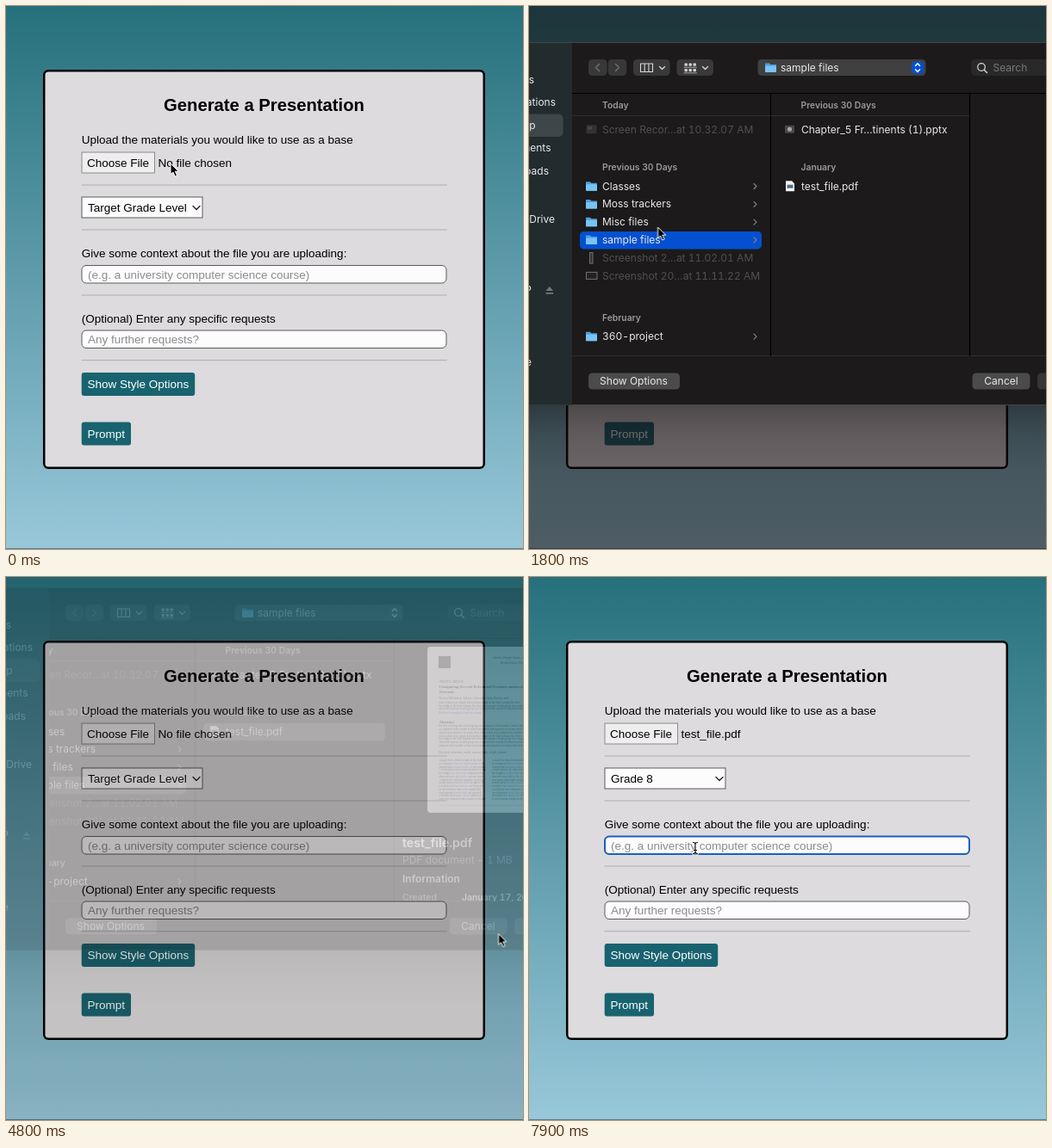
An HTML page that plays this animation: 600 by 631 pixels, repeating every 8000 ms.

```html
<!DOCTYPE html>
<html lang="en">
<head>
<meta charset="utf-8">
<title>Generate a Presentation</title>
<style>
html, body { margin: 0; width: 100%; height: 100%; overflow: hidden; background: #26707c; }
svg { display: block; width: 100vw; height: 100vh; }
text { font: 13.5px "Liberation Sans", Arial, sans-serif; white-space: pre; }
.title { font-size: 20.25px; font-weight: bold; }
.hint { fill: #8b8b8d; }
.white { fill: #fff; }
.mac text { font: 12px Inter, sans-serif; font-variant-numeric: tabular-nums; fill: #e9e9e9; }
.mac .head { font-size: 10.3px; font-weight: 600; fill: #9b9b9b; }
.mac .dim { fill: #515151; }
.mac .grey { fill: #929292; }
.mac .bold { font-weight: 600; }
.mac .small { font-size: 10.4px; }
.mac .name { font-size: 14.2px; }
.mac .option { font-size: 12.6px; fill: #f0f0f0; }
.mac .paper { font: 3.1px "Liberation Serif", serif; fill: #1c1c1c; }
.mac .paper.lead { font-size: 4.7px; font-weight: bold; fill: #111; }
.mac .paper.by { font-size: 3.8px; }
.mac .link { fill: #2a56c8; }
.line { fill: none; stroke-linecap: round; stroke-linejoin: round; }

/* One 8 s clock for everything; 1.25% is 100 ms. */
[class*="at-"] { animation: 8s step-end infinite; }
.was { --a: 1; --b: 0; }
.now { --a: 0; --b: 1; }
.at-list { animation-name: list; }
.at-pick { animation-name: pick; }
.at-named { animation-name: named; }
.at-graded { animation-name: graded; }
.at-beam { animation-name: beam; }
.at-focus { animation-name: focus; }
.at-caret { animation-name: caret; }
.at-menu { animation-name: menu; }
.at-blur { animation-name: blur; }
.at-open { animation-name: open; }
@keyframes list { 0% { opacity: var(--a) } 16.9%, 100% { opacity: var(--b) } }
@keyframes pick { 0% { opacity: var(--a) } 32.5%, 100% { opacity: var(--b) } }
@keyframes named { 0% { opacity: var(--a) } 62.5%, 100% { opacity: var(--b) } }
@keyframes graded { 0% { opacity: var(--a) } 88.1%, 100% { opacity: var(--b) } }
@keyframes beam { 0% { opacity: var(--a) } 91.3%, 100% { opacity: var(--b) } }
@keyframes focus { 0% { opacity: 0 } 93.1%, 100% { opacity: 1 } }
@keyframes caret { 0% { opacity: 0 } 93.1% { opacity: 1 } 97.5%, 100% { opacity: 0 } }
@keyframes menu { 0% { opacity: 0 } 72.5% { opacity: 1 } 88.1%, 100% { opacity: 0 } }
@keyframes blur { 0% { fill: #0450d0 } 53.1%, 100% { fill: #474747 } }
@keyframes open { 0% { fill: #363636 } 32.5% { fill: #0a5be0 } 53.1%, 100% { fill: #4b4b4b } }

#shade { animation: shade 8s linear infinite; }
#sheet { animation: sheet 8s linear infinite; }
#columns { animation: scroll 8s ease-in-out infinite; }
#hover { animation: hover 8s step-end infinite; }
#pointer { animation: pointer 8s ease-in-out infinite; }
@keyframes shade {
  0%, 10.6% { opacity: 0 } 11.25% { opacity: .14 } 12.5% { opacity: .36 } 15%, 55% { opacity: .56 }
  57.5% { opacity: .36 } 61.25%, 100% { opacity: 0 }
}
@keyframes sheet {
  0%, 10.6% { opacity: 0; transform: translateY(-42px) }
  11.25% { opacity: .56; transform: translateY(-26px) }
  12.5% { opacity: .86; transform: translateY(-10px) }
  15%, 55% { opacity: 1; transform: none }
  57.5% { opacity: .69; transform: translateY(-11.3px) }
  60% { opacity: .2; transform: translateY(-30px) }
  61.25%, 100% { opacity: 0; transform: translateY(-42px) }
}
@keyframes scroll { 0%, 32.5% { transform: none } 35%, 100% { transform: translateX(-61px) } }
@keyframes hover {
  0% { transform: none }
  75.25% { transform: none; animation-timing-function: steps(7) }
  85%, 100% { transform: translateY(151.76px) }
}
@keyframes pointer {
  0% { transform: translate(191px, 183px) }
  7.5%, 16.25% { transform: translate(143.5px, 172px) }
  22.5% { transform: translate(149.5px, 257px); animation-timing-function: ease-in }
  27.5% { transform: translate(250px, 238px); animation-timing-function: ease-out }
  31.9%, 34.4% { transform: translate(330px, 211px) }
  41.25% { transform: translate(596px, 434px) }
  50% { transform: translate(597px, 433px) }
  57.5% { transform: translate(597.5px, 432px) }
  63.75%, 65% { transform: translate(520px, 380px) }
  71.25% { transform: translate(205px, 234px) }
  75% { transform: translate(198.5px, 241px) }
  76.25% { transform: translate(198.5px, 241px); animation-timing-function: linear }
  85.6%, 88.1% { transform: translate(194px, 387px) }
  92.5%, 100% { transform: translate(193px, 315px) }
}
</style>
</head>
<body>
<svg id="stage" viewBox="0 0 600 631" preserveAspectRatio="none"></svg>
<script>
const text = (x, y, s, cls = "", more = "") => `<text x="${x}" y="${y}" class="${cls}" ${more}>${s}</text>`;
const box = (x, y, w, h, fill, r = 0, more = "") =>
  `<rect x="${x}" y="${y}" width="${w}" height="${h}" rx="${r}" fill="${fill}" ${more}/>`;
const line = (d, stroke, width = 1, cls = "") =>
  `<path class="line ${cls}" d="${d}" stroke="${stroke}" stroke-width="${width}"/>`;
const group = (cls, ...parts) => `<g class="${cls}">${parts.join("")}</g>`;
const each = (list, fn) => list.map(fn).join("");
const range = n => [...Array(n).keys()];

// Web form
const field = (y, hint) =>
  box(88, y, 423, 20.5, "#fdfcfd", 5, 'stroke="#5a5a5c"') + text(95, y + 15, hint, "hint");
const button = (y, w, label) => box(87.7, y, w, 27, "#18636f", 3) + text(94.5, y + 18, label, "white");

const form = [
  box(0, 0, 600, 631, "url(#sky)"),
  box(0, 630, 600, 1, "#5d7f8b"),
  box(44.2, 75.2, 510.6, 461.6, "#dddbdd", 5, 'stroke="#000" stroke-width="2.5"'),
  text(299.5, 122, "Generate a Presentation", "title", 'text-anchor="middle"'),
  text(87.7, 160.3, "Upload the materials you would like to use as a base"),
  box(88, 170, 84.5, 24, "#efeeef", 0, 'stroke="#8a8a8c"'),
  text(94, 186.8, "Choose File"),
  text(176.5, 186.8, "No file chosen", "at-named was"),
  text(176.5, 186.8, "test_file.pdf", "at-named now"),
  each([208, 260, 336, 411.7], y => line(`M88 ${y}H511.5`, "#a9aeb6")),
  box(88, 222, 140, 24, "#fdfcfd", 0, 'stroke="#5a5a5c"'),
  text(95, 238.7, "Target Grade Level", "at-graded was"),
  text(95, 238.7, "Grade 8", "at-graded now"),
  line("M217 232.5l4 4 4-4", "#222", 1.3),
  text(87.7, 291.7, "Give some context about the file you are uploading:"),
  field(301.5, "(e.g. a university computer science course)"),
  box(88, 301.5, 423, 20.5, "none", 5, 'stroke="#1b5fc2" stroke-width="2" class="at-focus"'),
  line("M95 305V318.5", "#000", 1, "at-caret"),
  text(87.7, 368, "(Optional) Enter any specific requests"),
  field(377, "Any further requests?"),
  button(426, 131.5, "Show Style Options"),
  button(483.5, 57.3, "Prompt")
].join("");

// File chooser
const folder = (x, y) =>
  `<path d="M${x} ${y - 5}h5l1.5 1.5h6.5v9h-13z" fill="#4a9fdc"/>` + box(x, y - 2, 13, 7.5, "#79c3f3", 1);
const icons = {
  folder,
  recording: (x, y) => box(x + .5, y - 5, 12, 10, "#333", 1) + box(x + 2, y - 3, 5, 3, "#484848"),
  tall: (x, y) => box(x + 4.5, y - 6, 3.5, 12.5, "#333", 0, 'stroke="#737373"'),
  wide: (x, y) => box(x + .5, y - 4, 12.5, 8, "#222", 0, 'stroke="#737373"'),
  tile: (x, y) => box(x, y - 6.5, 13, 13, "#6a6a6a", 2),
  slides: (x, y) => box(x, y - 4.5, 11, 9, "#4b4747", 1) + box(x + 3, y - 2.5, 5, 5, "#aaa6a3", 2),
  pdf: (x, y) => `<path d="M${x + 1} ${y - 6}h7l3 3v9h-10z" fill="#f5f5f5"/>` + box(x + 2.5, y - 1.5, 7, 4, "#4c6d8c")
};
const row = (x, y, icon, name, cls = "") => icons[icon](x, y - .3) + text(x + 19, y + 4, name, cls) +
  (icon === "folder" ? line(`M${x + 195} ${y - 3}l3 3-3 3`, "#858585", 1.2) : "");
const head = (x, y, s) => text(x, y + 3.7, s, "head");
const selected = (x, y) => box(x, y - 10, 211, 20.5, "#0450d0", 4.5, 'class="at-blur"');

// The top heading of a column sits a little higher than the ones below it.
const recent = (headY, y) => head(85, headY, "Previous 30 Days") + selected(59, y + 62.4) +
  each(["Classes", "Moss trackers", "Misc files", "sample files"], (s, i) => row(66, y + i * 20.8, "folder", s)) +
  row(66, y + 83.4, "tall", "Screenshot 2…at 11.02.01 AM", "dim") +
  row(66, y + 104.2, "wide", "Screenshot 20…at 11.11.22 AM", "dim") +
  head(85, y + 152.3, "February") + row(66, y + 174.6, "folder", "360-project");

const filler = "the observed response of each group was compared with a model of shared movement and repeated over many short trials so that every sample had a similar weight in the final estimate ";
const words = (i, n) => (filler + filler).substr(i * 37 % filler.length, n);
const print = (x, y, s, cls = "") => text(x, y, s, "paper " + cls);
const body = (x, i) => print(x, 244 + i * 3.75, i % 3
  ? `${words(i, 12)}<tspan class="link">${words(i + 4, 17)}</tspan>${words(i + 2, 12)}` : words(i + x, 41));

const page = box(489, 111, 140, 193, "#fcfcfc", 4) + box(502, 122, 14, 14, "#4a4a4a") +
  print(565, 125, "Journal of Sample Studies, 12") + print(574, 131, "Research article 2024") +
  print(502.5, 152.5, "ORIGINAL ARTICLE") +
  print(502.5, 158.5, "Comparing Several Rehearsed Gestures across a", "lead") + print(502.5, 164.7, "Network", "lead") +
  print(502.5, 171.5, "Torvin Mellick ●, Sabrine Ostvald, Junia Parlow and", "by") +
  each(range(3), i => print(502.5, 177 + i * 3.6, words(i + 3, 78))) +
  print(502.5, 189, "Received in spring; accepted in autumn", "link") +
  print(502.5, 199.5, "Abstract", "lead") +
  each(range(7), i => print(502.5, 203.8 + i * 3.9, words(i, 80))) +
  print(502.5, 234.5, "Keywords: movement, model, response, trials, weight, estimate") +
  each(range(13), i => body(502.5, i) + body(564, i)) + line("M502 295.5H600", "#aaa", .5);

const preview = `<g transform="translate(61 0)">` + page +
  text(460, 344, "test_file.pdf", "name bold") + text(460, 362.5, "PDF document - 1 MB", "grey") +
  text(460, 385, "Information", "bold") + text(460, 406, "Created", "small grey bold") +
  text(529, 406, "January 17, 2024", "small bold") + "</g>";

const columns = `<g clip-path="url(#browser)"><g id="columns">` +
  line("M40 127.5H511", "#303030") +
  group("at-list was", recent(115, 143.3), head(85, 361.5, "January"),
    row(66, 383.5, "tile", "Polo On Our Rooftops", "dim")) +
  group("at-list now", head(85, 115, "Today"),
    row(66, 143.5, "recording", "Screen Recor…at 10.32.07 AM", "dim"), recent(187.5, 209.5)) +
  head(315.5, 115, "Previous 30 Days") + row(297, 143.5, "slides", "Chapter_5 Fr…tinents (1).pptx") +
  head(315.5, 187.5, "January") +
  group("at-pick now", selected(290, 209.7)) + row(297, 209.5, "pdf", "test_file.pdf") +
  group("at-pick now", preview) +
  line("M280.5 101V407M511.5 101V407", "#000", 1.2) + "</g></g>";

const places = [["Recents", 6, 86], ["Applications", 31, 112], ["Desktop", 7.5, 138.5], ["Documents", 25.5, 165],
  ["Downloads", 23, 191.5], ["Drive", 30, 248], ["P", 3, 330], ["Home", 3, 413.5]];
const sidebar = box(-5, 43, 55, 420.5, "#222c2e") + box(-10, 125.5, 49.5, 26.5, "#3d4648", 5) +
  each(places, ([s, x, y]) => text(x, y + 4, s, "", 'text-anchor="end"')) +
  `<path d="M19.5 331l4.3-5 4.3 5zM19.5 333h8.6v1.8h-8.6z" fill="#727979"/>`;

const down = x => line(`M${x} 70.5l3 3 3-3`, "#d0d0d0", 1.4);
const toolbar = box(69, 62, 21.5, 19, "#383838", 4.5) + box(91.8, 62, 21.5, 19, "#383838", 4.5) +
  line("M81.5 67.5l-4 4 4 4M100.5 67.5l4 4-4 4", "#707070", 1.4) +
  box(121, 62, 42.5, 19, "#393939", 4.5) + box(171.5, 62, 42.5, 19, "#393939", 4.5) +
  line("M129.5 67h14v9.5h-14zM134.2 67v9.5M138.9 67v9.5", "#d8d8d8", 1.1) + down(151.5) + down(201.5) +
  each(range(6), i => box(180.5 + i % 3 * 5, 66.5 + (i / 3 | 0) * 6.5, 3.4, 3.2, "#d0d0d0", .6)) +
  line("M180 71.3H194.5M180 77.8H194.5", "#bbb", .8) +
  box(265.5, 62, 195, 19, "#404040", 4.5) + folder(274, 71.5) + text(292, 75.6, "sample files") +
  box(444, 64.5, 14, 14, "#0450d0", 3.5, 'class="at-blur"') +
  line("M448.5 69.5l2.5-2.7 2.5 2.7M448.5 73.7l2.5 2.7 2.5-2.7", "#fff", 1.4) +
  box(513, 62, 100, 19, "#292929", 4.5) +
  `<circle cx="525" cy="71" r="4.3" fill="none" stroke="#d5d5d5" stroke-width="1.3"/>` +
  line("M528.2 74.2l3.3 3.3", "#d5d5d5", 1.4) + text(538.5, 75.9, "Search", "grey", 'opacity=".75"');

const footer = box(69, 426.5, 106, 19, "#4b4b4b", 4.5) + text(121.5, 440, "Show Options", "", 'text-anchor="middle"') +
  box(514.5, 426.5, 67, 19, "#4b4b4b", 4.5) + text(548, 440, "Cancel", "", 'text-anchor="middle"') +
  box(590, 426.5, 60, 19, "#363636", 4.5, 'class="at-open"') + text(603, 440, "Open");

const sheet = `<g id="sheet" class="mac">` + box(0, 463, 600, 75, "url(#shadow)") +
  box(-5, 42.5, 610, 421, "#1c1a1a", 0, 'stroke="#434545"') +
  line("M50 101.5H600", "#000", 1.2) + line("M50 406.5H600", "#303030") +
  columns + sidebar + toolbar + footer + "</g>";

// Grade menu
const menu = group("mac at-menu",
  box(80, 218.5, 141.5, 269.5, "url(#glass)", 5.5, 'stroke="#6b6b6b" filter="url(#soft)"'),
  box(85, 223.5, 131.5, 21.5, "#4079e6", 4, 'id="hover"'),
  line("M90.5 234.5l2.8 3.8 5-8", "#fff", 1.5),
  each(range(12), i => text(102.5, 238.9 + i * 21.68, `Grade ${i + 1}`, "option")));

const beam = "M-2.5 -6.5Q0 -6.5 0 -4.5Q0 -6.5 2.5 -6.5M0 -4.5V4.5M-2.5 6.5Q0 6.5 0 4.5Q0 6.5 2.5 6.5M-1.5 2.5H1.5";
const pointer = `<g id="pointer">` +
  group("at-beam was", `<path d="M0 0V12.6L2.9 10 5.2 15 7.5 14 5.3 9.2H9.2Z" fill="#000" stroke="#fff" stroke-width="1"/>`) +
  group("at-beam now", line(beam, "#fff", 2.6), line(beam, "#111", 1.2)) + "</g>";

const stop = (at, color, alpha = 1) => `<stop offset="${at}" stop-color="${color}" stop-opacity="${alpha}"/>`;
const gradient = (id, ...stops) => `<linearGradient id="${id}" x2="0" y2="1">${stops.join("")}</linearGradient>`;
const defs = "<defs>" +
  gradient("sky", stop(0, "#26707c"), stop(1, "#98c8da")) +
  gradient("shadow", stop(0, "#000", .28), stop(.45, "#000", .1), stop(1, "#000", 0)) +
  gradient("glass", stop(0, "#4d4b4b"), stop(.62, "#4b4a4a"), stop(.82, "#3e4a4c"), stop(1, "#4a4b4b")) +
  `<clipPath id="browser"><rect x="50" y="102" width="550" height="304.5"/></clipPath>
  <filter id="soft"><feDropShadow dx="0" dy="2" stdDeviation="2" flood-opacity=".22"/></filter></defs>`;

document.getElementById("stage").innerHTML =
  defs + form + box(0, 0, 600, 631, "#150a0b", 0, 'id="shade"') + sheet + menu + pointer;
</script>
</body>
</html>
```
